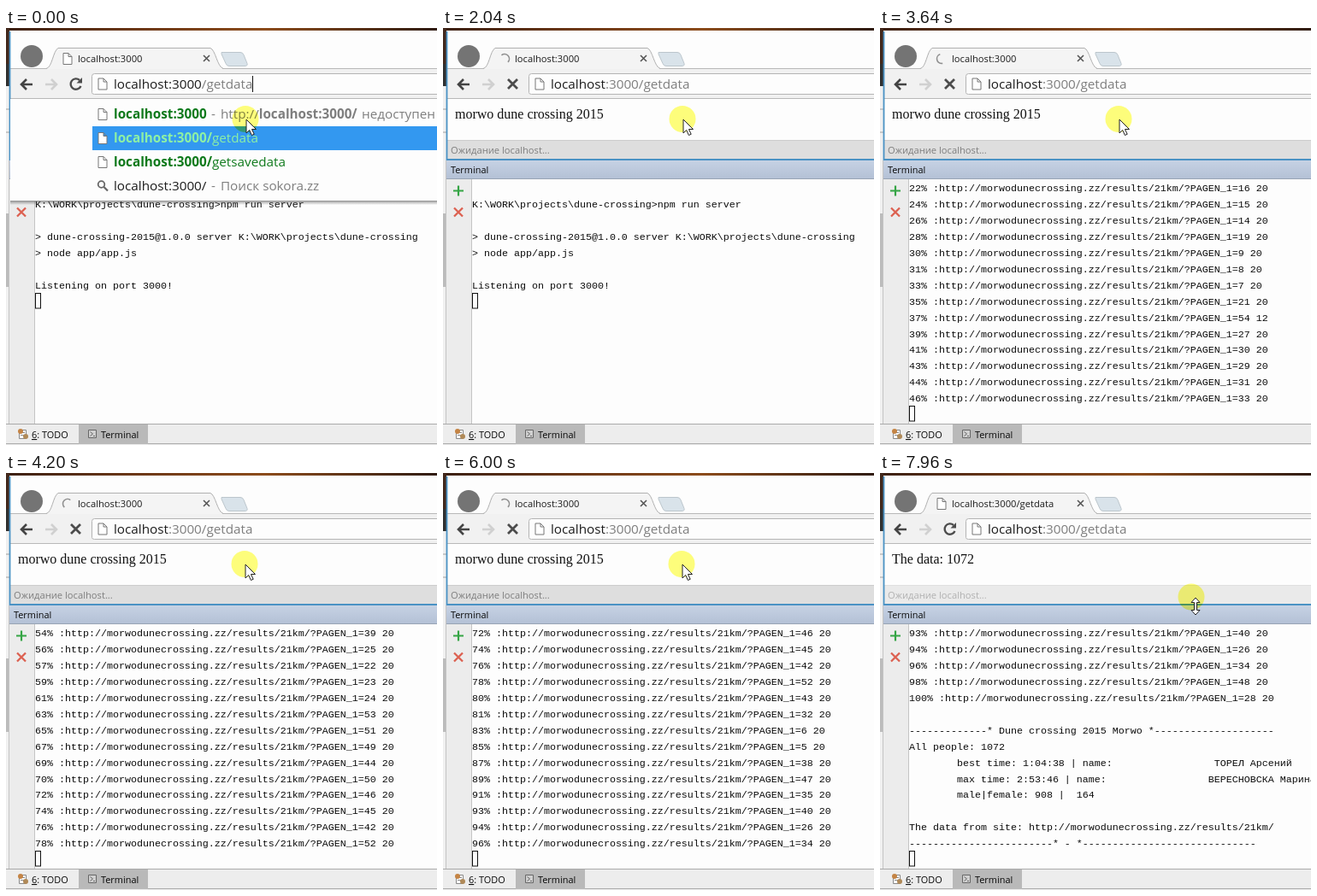
Animation, 504 px wide and 488 px high, one loop 8000 ms. Source, as an HTML page:

```html
<!DOCTYPE html>
<html lang="ru">
<head>
<meta charset="utf-8">
<title>Terminal run</title>
<style>
  html, body { margin: 0; width: 100%; height: 100%; overflow: hidden; background: #fdfdfd; }
  svg { display: block; width: 504px; height: 488px; }
  text { font-family: "Open Sans", "Noto Sans", sans-serif; fill: #1c1c1c; white-space: pre; }
  .ui { font-size: 11.2px; }
  .label { font-size: 10.9px; fill: #080808; }
  .bar { font-size: 15.25px; }
  .page { font: 16px "Liberation Serif", serif; fill: #111; }
  #terminal text { font: 11.667px "Liberation Mono", monospace; fill: #0c0c0c; }
  .bold { font-weight: 700; }
  .dim { fill: #7e7e7e; }
  .match { fill: #0f7a1c; }
  .line { fill: none; }
  #halo { mix-blend-mode: multiply; }
</style>
</head>
<body>
<svg viewBox="0 0 504 488">
  <defs>
    <linearGradient id="desk">
      <stop offset="0" stop-color="#3c2014"/><stop offset=".3" stop-color="#6c3818"/>
      <stop offset=".6" stop-color="#8c4c1c"/><stop offset="1" stop-color="#301c14"/>
    </linearGradient>
    <linearGradient id="header" x2="0" y2="1">
      <stop offset="0" stop-color="#c6d2e4"/><stop offset="1" stop-color="#b3c0d5"/>
    </linearGradient>
    <linearGradient id="shade" x2="0" y2="1">
      <stop offset="0" stop-color="#444" stop-opacity=".55"/><stop offset="1" stop-color="#444" stop-opacity="0"/>
    </linearGradient>
    <path id="sheet" d="M.5 .5h6l4 4v9h-10zM6.5 .5v4h4" fill="#fff" stroke="#777"/>
  </defs>

  <!-- Editor window -->
  <rect width="504" height="488" fill="#fdfdfd"/>
  <rect width="4" height="488" fill="#f0f0f0"/>
  <rect width="504" height="3" fill="url(#desk)"/>
  <rect width="4" height="42" fill="#42281c"/>
  <rect y="42" width="4" height="26" fill="#303030"/>
  <path d="M0 95h4M0 122h4" stroke="#a0a0a0"/>
  <rect y="217" width="4" height="86" fill="#bcbcbc"/>
  <rect x="4" y="155" width="500" height="22" fill="url(#header)"/>
  <path d="M4 176.5h500" stroke="#98a4b4"/>
  <text class="label" x="9" y="170">Terminal</text>
  <rect x="4" y="177" width="29" height="286" fill="#ececec"/>
  <path d="M3.5 155v332M33.5 177v286" stroke="#c4c4c4"/>
  <path d="M12 190.500h12M18 184.500v12" stroke="#35a545" stroke-width="2.2"/>
  <path d="M13 210.500l10 10m0-10l-10 10" stroke="#dc6050" stroke-width="2.3"/>
  <g id="terminal"></g>
  <rect id="prompt" x="34.5" width="6" height="17.500" fill="none" stroke="#111"/>

  <rect x="0" y="463" width="504" height="25" fill="#ededed"/>
  <path d="M0 463.500h504M0 486.500h504" stroke="#aaa"/>
  <rect x="85" y="464" width="81" height="23" fill="#b9b9b9"/>
  <path d="M15.500 470.500h8v10h-8zM17 473.500h5M17 476.500h4" fill="#fff" stroke="#888"/>
  <circle cx="17" cy="472" r="3" fill="#c48445"/>
  <circle cx="23" cy="478" r="3" fill="#b08a58"/>
  <text class="label" x="30" y="480"><tspan text-decoration="underline">6</tspan>: TODO</text>
  <path d="M96.500 470.500h9v9h-9zM98.500 472.500l3 2.500-3 2.500M102 477.500h2" fill="#d0d0d0" stroke="#666"/>
  <text class="label" x="111" y="480">Terminal</text>

  <!-- Browser window -->
  <rect x="5" y="3" width="499" height="152" fill="#fdfdfd"/>
  <circle cx="30" cy="33" r="13" fill="#747474"/>
  <path d="M252 28.500h22q3 0 4 3l4 10q1 3-3 3h-18q-3 0-4-3l-5-11q0-2 0-2z" fill="#d9e3ea" stroke="#bcc6cc"/>
  <rect x="5" y="47" width="499" height="36" fill="#f1f1f1"/>
  <path d="M5 47.500h43M253 47.500h251" stroke="#b8b8b8"/>
  <path d="M47 48c7-1 8-22 14-24h178c6 2 8 22 15 24z" fill="#f4f4f4"/>
  <path d="M47 47.500c7-1 8-21 14-24h178c6 2 8 22 15 24" class="line" stroke="#b0b0b0"/>
  <path d="M231 32l7 7m0-7l-7 7" stroke="#555" stroke-width="1.600"/>
  <use id="favicon" href="#sheet" x="66.500" y="29"/>
  <circle id="spinner" cx="72" cy="36" r="5.500" class="line" stroke="#909090" stroke-width="1.600" stroke-dasharray="16.300 30"/>
  <text id="tabTitle" class="ui" x="84" y="40"></text>

  <path d="M31 66H18m6-6l-6 6 6 6" class="line" stroke="#444" stroke-width="2.600"/>
  <path d="M46 66h13m-6-6l6 6-6 6" class="line" stroke="#d0d0d0" stroke-width="2.600"/>
  <g id="reload"><path d="M86 61a6.200 6.200 0 1 0 1.500 7" class="line" stroke="#4c4c4c" stroke-width="2.400"/><path d="M89 58v6.500h-6.500z" fill="#4c4c4c"/></g>
  <path id="stop" d="M76 60l11 11m0-11l-11 11" stroke="#4c4c4c" stroke-width="2.800"/>
  <path d="M504 53.500H103.500q-3 0-3 3v19q0 2 3 2H504" fill="#fdfdfd" stroke="#b4b4b4"/>
  <use href="#sheet" x="107.500" y="58.500"/>
  <text class="bar" x="126" y="71">localhost<tspan id="port">:3000</tspan><tspan class="dim">/getdata</tspan></text>
  <path id="caret" d="M288.500 56v19" stroke="#111"/>
  <path d="M5 82.500h499" stroke="#b8b8b8"/>
  <rect x="5" y="83" width="499" height="70" fill="#fdfdfd"/>
  <text id="page" class="page" x="14" y="106"></text>
  <g id="status">
    <rect x="5" y="131" width="499" height="22" fill="#dedede"/>
    <path d="M5 131.500h499" stroke="#ccc"/>
    <text class="ui dim" x="9" y="147">Ожидание localhost...</text>
  </g>
  <path d="M4.500 4v150H504" class="line" stroke="#4a92c4" stroke-width="1.800"/>

  <g id="dropdown">
    <rect x="5" y="202" width="499" height="5" fill="url(#shade)"/>
    <rect x="5" y="83" width="499" height="119" fill="#fdfdfd"/>
    <path d="M5 202.500h499" stroke="#999"/>
    <rect x="101" y="115" width="403" height="28" fill="#3398f0"/>
    <use href="#sheet" x="107.500" y="94"/>
    <use href="#sheet" x="107.500" y="122"/>
    <use href="#sheet" x="107.500" y="150"/>
    <circle cx="111.500" cy="183" r="3.800" class="line" stroke="#666" stroke-width="1.800"/>
    <path d="M114.500 186l4.500 4.500" stroke="#666" stroke-width="2.200"/>
    <g class="bar">
      <text class="match bold" x="126" y="106">localhost:3000</text>
      <text class="dim" x="240" y="106">-</text>
      <text class="dim" x="251" y="106">http://<tspan class="bold">localhost:3000/</tspan></text>
      <text class="dim" x="416" y="106">недоступен</text>
      <text x="126" y="134" style="fill:#8df0a4"><tspan class="bold">localhost:3000/</tspan>getdata</text>
      <text class="match" x="126" y="162"><tspan class="bold">localhost:3000/</tspan>getsavedata</text>
      <text x="126" y="190">localhost:3000/</text>
      <text class="dim" x="240" y="190">-</text>
      <text class="dim" x="251" y="190">Поиск sokora.zz</text>
    </g>
  </g>

  <circle id="halo" r="15.500" fill="#ffff7c"/>
  <path id="arrow" d="M0 0v16l3.700-3.500 2.700 6 2.800-1.200-2.700-5.800h5z" fill="#fff" stroke="#222"/>
  <path id="resize" d="M0-10l5 5.500H1.500v9H5L0 10l-5-5.500h3.500v-9H-5z" fill="#fff" stroke="#222"/>
</svg>

<script>
  const LOOP = 8000, STEP = 40, ROWS = 15, PITCH = 18.9;
  const ENTER = 200, LAST_PAGES = 7000, REPORT = 7400, LOADED = 7440, NUDGE = 3600;
  const $ = id => document.getElementById(id);
  const clamp = v => Math.min(1, Math.max(0, v));
  const ease = v => v * v * (3 - 2 * v);
  const show = (id, on) => $(id).setAttribute('visibility', on ? 'visible' : 'hidden');
  const place = (id, x, y) => $(id).setAttribute('transform', `translate(${x} ${y})`);
  const dashes = n => '-'.repeat(n);
  const indent = ' '.repeat(8);

  const site = 'http://morwodunecrossing.zz/results/21km/';
  const pages = [
    1, 20, 13, 3, 2, 11, 10, 12, 4, 18, 17, 16, 15, 14, 19, 9, 8, 7,
    21, 54, 27, 30, 29, 31, 33, 36, 37, 41, 39, 25, 22, 23, 24, 53, 51, 49,
    44, 50, 46, 45, 42, 52, 43, 32, 6, 5, 38, 47, 35, 40, 26, 34, 48, 28
  ];
  const intro = [
    '', 'K:\\WORK\\projects\\dune-crossing>npm run server', '',
    '> dune-crossing-2015@1.0.0 server K:\\WORK\\projects\\dune-crossing',
    '> node app/app.js', '', 'Listening on port 3000!'
  ];
  const progress = pages.map((page, i) =>
    `${Math.round((i + 1) * 100 / pages.length)}% :${site}?PAGEN_1=${page} ${page === 54 ? 12 : 20}`);
  const report = [
    '', `${dashes(13)}* Dune crossing 2015 Morwo *${dashes(20)}`, 'All people: 1072',
    `${indent}best time: 1:04:38 | name:${' '.repeat(17)}ТОРЕЛ Арсений`,
    `${indent}max time: 2:53:46 | name:${' '.repeat(17)}ВЕРЕСНОВСКА Марина`,
    `${indent}male|female: 908 |  164`, '',
    `The data from site: ${site}`, `${dashes(24)}* - *${dashes(29)}`
  ];
  const log = [...intro, ...progress, ...report];

  const rows = Array.from({ length: ROWS - 1 }, (_, i) => {
    const row = document.createElementNS('http://www.w3.org/2000/svg', 'text');
    row.setAttribute('x', 34);
    row.setAttribute('y', 191.4 + i * PITCH);
    return $('terminal').appendChild(row);
  });

  function lineCount(t) {
    if (t >= REPORT) return log.length;
    if (t >= LAST_PAGES) return intro.length + 53;
    const done = Math.floor(11.5 + (t - 3160) * 31 / 1040);
    return intro.length + Math.min(52, Math.max(0, done));
  }

  function drawTerminal(t) {
    const count = lineCount(t);
    const top = Math.max(0, count - rows.length);
    rows.forEach((row, i) => {
      const line = top + i < count ? log[top + i] : '';
      if (row.textContent !== line) row.textContent = line;
    });
    $('prompt').setAttribute('y', Math.floor(178 + (count - top) * PITCH) + 0.5);
  }

  function drawBrowser(t) {
    const typing = t < ENTER, loaded = t >= LOADED, loading = !typing && !loaded;
    show('dropdown', typing);
    show('caret', typing);
    show('favicon', !loading);
    show('reload', !loading);
    show('spinner', loading);
    show('stop', loading);
    show('status', !typing);
    $('port').setAttribute('class', typing ? '' : 'dim');
    $('tabTitle').textContent = loaded ? 'localhost:3000/getdata' : 'localhost:3000';
    $('page').textContent = loaded ? 'The data: 1072' : 'morwo dune crossing 2015';
    $('status').setAttribute('opacity', 1 - clamp((t - 7750) / 520));
    const angle = 45 + (t - 2040) / 660 * 360;
    $('spinner').setAttribute('transform', `rotate(${-angle - 85} 72 36)`);
  }

  function drawPointer(t) {
    const x = t < NUDGE ? 281 : 280, y = 107;
    const move = ease(clamp((t - 7480) / 440));
    const px = x + (369 - x) * move, py = y + (156 - y) * move;
    const trail = ease(clamp((t - 7520) / 440));
    const resizing = py > 151;
    place('arrow', px, py);
    place('resize', px, py);
    show('arrow', !resizing);
    show('resize', resizing);
    place('halo', x - 1 + (365 - x) * trail, 106.5 + 38.5 * trail);
  }

  const start = performance.now();
  function frame() {
    const t = Math.floor((performance.now() - start) % LOOP / STEP) * STEP;
    drawTerminal(t);
    drawBrowser(t);
    drawPointer(t);
    requestAnimationFrame(frame);
  }
  frame();
</script>
</body>
</html>
```
